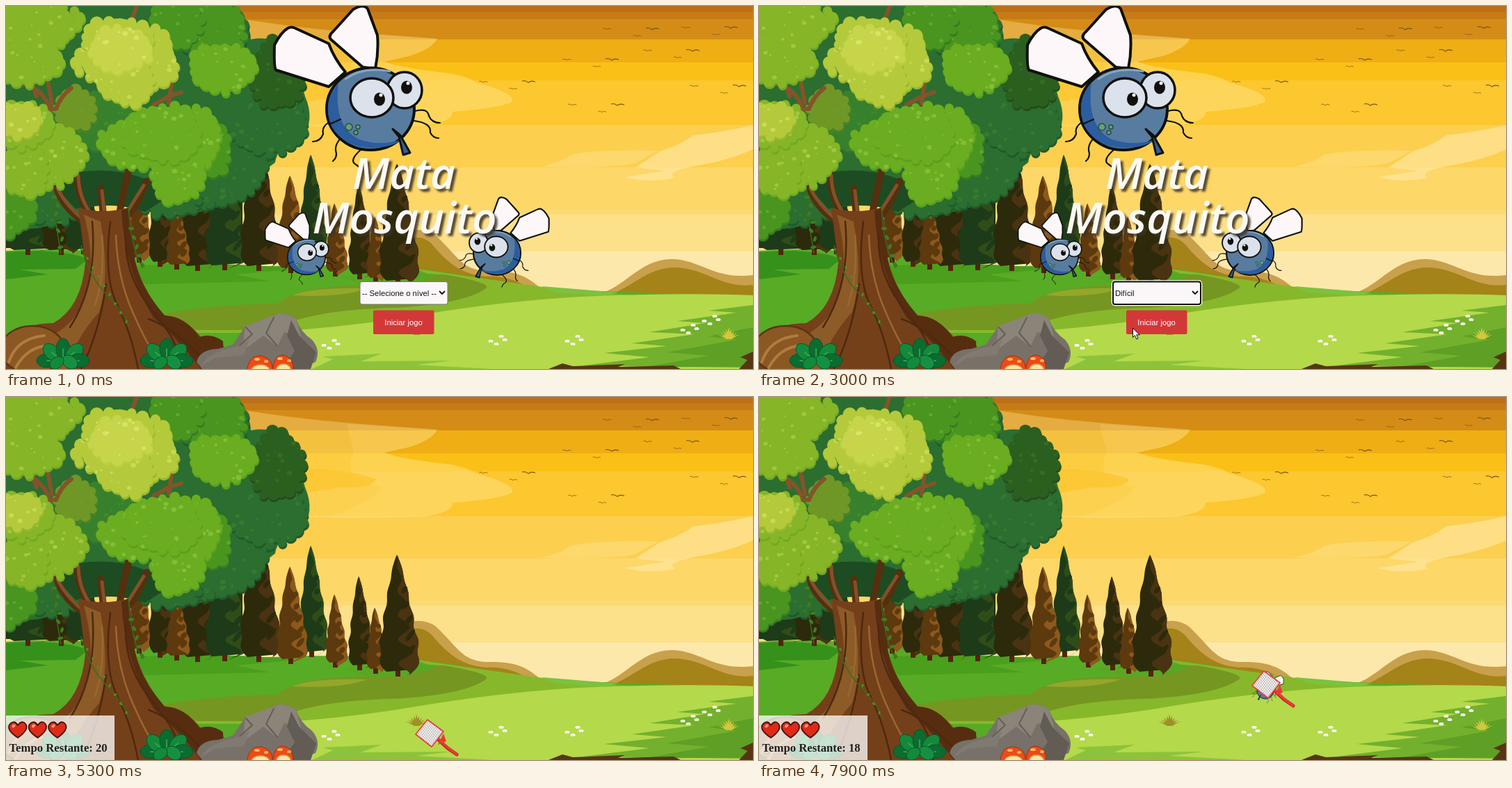
An HTML page with a canvas that plays this animation: 1074x522 px, repeating every 8 s.

```html
<!DOCTYPE html>
<html lang="pt">
<head>
<meta charset="utf-8">
<title>Mata Mosquito</title>
<style>
html, body { margin: 0; width: 100%; height: 100%; overflow: hidden; }
canvas { display: block; }
</style>
</head>
<body>
<canvas id="stage" width="1074" height="522"></canvas>
<script>
const W = 1074, H = 522, LOOP = 8000;
const stage = document.getElementById('stage').getContext('2d');
const backdrop = document.createElement('canvas');
backdrop.width = W; backdrop.height = H;
let g = backdrop.getContext('2d');

let seed = 7;
const rnd = () => (seed = (seed * 16807) % 2147483647) / 2147483647;

function shape(d, fill, stroke, width = 1) {
  const path = new Path2D(d);
  g.lineJoin = g.lineCap = 'round';
  if (fill) { g.fillStyle = fill; g.fill(path); }
  if (stroke) { g.strokeStyle = stroke; g.lineWidth = width; g.stroke(path); }
}
function oval(x, y, rx, ry, fill, stroke, width = 1, turn = 0) {
  g.beginPath();
  g.ellipse(x, y, rx, ry, turn, 0, 7);
  if (fill) { g.fillStyle = fill; g.fill(); }
  if (stroke) { g.strokeStyle = stroke; g.lineWidth = width; g.stroke(); }
}
function box(x, y, w, h, r, fill, stroke, width = 1) {
  g.beginPath();
  g.roundRect(x, y, w, h, r);
  if (fill) { g.fillStyle = fill; g.fill(); }
  if (stroke) { g.strokeStyle = stroke; g.lineWidth = width; g.stroke(); }
}
function label(text, x, y, font, fill, align = 'left') {
  g.font = font; g.fillStyle = fill; g.textAlign = align;
  g.fillText(text, x, y);
}

// ---------- landscape ----------
function sky() {
  [[0, '#bc7017'], [9, '#c77b16'], [19, '#d48c17'], [48, '#eeae14'], [81, '#fbc017'],
   [107, '#fcc72f'], [171, '#fccf4e'], [232, '#fdd768'], [293, '#fcda73'],
   [300, '#fce08a'], [353, '#fde8ab']].forEach(([y, color]) => {
    g.fillStyle = color; g.fillRect(0, y, W, H);
  });
  shape('M300 12Q400 30 500 38L620 47Q612 62 580 72L544 80Q570 90 640 97Q670 104 676 110Q735 126 727 138Q710 147 642 152Q644 166 600 172Q520 176 420 172L340 100Z', 'rgba(255,226,140,.36)');
  shape('M490 39L620 47Q612 62 580 72L544 80Q570 90 640 97Q670 104 676 110Q735 126 727 138Q710 147 642 152Q644 166 600 172L460 173Q530 150 540 130Q480 118 500 80Z', 'rgba(255,235,160,.13)');
  shape('M400 104Q480 100 532 118Q528 132 480 130L420 140Z', 'rgba(252,196,40,.65)');
  shape('M1074 171Q1040 180 988 186Q970 200 940 209L905 232 948 237 890 246Q920 255 962 247Q946 239 990 230Q1040 222 1074 206Z', 'rgba(255,233,165,.65)');
  shape('M770 231Q800 224 812 214Q850 206 938 208L905 226Q870 234 770 231Z', 'rgba(255,233,165,.35)');
  const bird = (x, y, s) =>
    shape(`M${x - 7 * s} ${y - s}q${4 * s} ${-s} ${7 * s} ${2 * s}q${3 * s} ${-3 * s} ${8 * s} ${-s}`, null, '#775616', s);
  [[864, 33], [977, 31], [922, 64], [806, 77], [686, 109], [989, 115], [814, 142]].forEach(([x, y]) => {
    bird(x, y, .75); bird(x + 65, y, 1.2); bird(x + 43, y + 10, .7);
  });
}

function land() {
  shape('M550 340Q590 310 618 330C650 360 655 379 690 381C740 380 750 390 780 415H560Z', '#c9a04c');
  shape('M550 350Q590 320 612 342C640 376 660 386 690 389Q730 386 765 415H550Z', '#a48318');
  shape('M845 416C890 408 910 362 960 364C1000 366 1020 394 1074 387V425H845Z', '#c9a04c');
  shape('M858 418C900 408 920 374 966 376C1010 380 1030 406 1074 401V425H850Z', '#a48318');
  shape('M0 352Q100 345 220 362T420 372Q560 372 640 384Q720 400 800 408L1074 418V522H0Z', '#58ab25');
  shape('M0 354Q80 348 118 364L100 378 20 379 60 386 0 393Z', '#35911a');
  shape('M180 374Q300 366 420 378L330 386 380 396 200 400Z', '#4a9f1c');
  shape('M590 378Q700 394 800 408L900 416 760 440 500 470 200 470 240 450 420 440Q610 430 640 400Z', '#87b82c');
  shape('M180 456Q250 430 390 428Q420 402 520 402Q560 384 630 386Q700 398 690 406Q660 428 560 434Q440 436 380 466H190Z', '#769622');
  shape('M412 416Q440 404 520 406Q480 420 412 416Z', '#93a72b');
  shape('M520 402Q600 404 620 386L560 380 480 390Z', '#58a723');
  shape('M770 403L880 412 860 417 790 412Z', '#7bc23f');
  shape('M390 468Q480 462 560 450Q720 422 850 417T1074 416V522H380Z', '#b4d94b');
  shape('M440 522L470 508 455 504 540 500 510 511 640 510 590 516 700 522Z', '#8dc33b');
  shape('M1074 430L1010 438 1050 441 965 453 1005 456 925 469 990 472 900 485 950 489 860 499 925 505 830 517 1074 520Z', '#73b02d');
  shape('M1074 462L1010 475 1050 480 950 498 1010 503 920 519H1074Z', '#5e9f25');
  shape('M1074 497L1056 505 1066 509 1054 522H1074ZM780 522L800 514 815 518 890 515 880 519 960 517 970 522Z', '#573512');
  [[466, 487], [706, 481], [816, 481], [982, 465], [1013, 452]].forEach(([x, y]) => {
    [[-9, 1], [6, -6], [11, -1], [-1, 5]].forEach(([dx, dy]) => {
      oval(x + dx, y + dy, 3.5, 2, '#fff');
      oval(x + dx, y + dy + 1, 1, .8, '#e7d66a');
    });
  });
  const tuft = (x, y, color) => {
    for (let i = -4; i <= 4; i++)
      shape(`M${x - 3} ${y + 8}L${x + i * 4} ${y - 9 + Math.abs(i) * 2.5}L${x + 4} ${y + 8}Z`, color);
  };
  tuft(590, 465, '#a08f2a');
  tuft(1039, 471, '#d1c83c');
}

function pine(x, top, base, w, dark, lit) {
  const half = t => w * 1.12 * Math.min(1, 1.1 * t ** .75) * (1 - .07 * Math.cos(t * 30)) * Math.sqrt(1 - .6 * t ** 12);
  const inner = t => half(t) * (.35 + .4 * Math.sin(t * 30 + x));
  const at = t => top + (base - top) * t;
  const fill = (left, color) => {
    g.beginPath();
    g.moveTo(x, top);
    for (let t = 0; t <= 1; t += .02) g.lineTo(x + half(t) + 4 * t, at(t));
    for (let t = 1; t >= 0; t -= .02) g.lineTo(x + left(t) + 4 * t, at(t) + (left === inner ? 5 : 0));
    g.fillStyle = color;
    g.fill();
  };
  g.fillStyle = '#54220d';
  g.fillRect(x - 2, base - 4, 7, 11);
  fill(t => -half(t), dark);
  fill(inner, lit);
  for (let t = .3; t < .95; t += .13)
    oval(x + half(t) * .75, at(t), half(t) * .4, 3.5, dark, null, 1, -.9);
}

function forest() {
  const brown = ['#5d390e', '#8d591c'], umber = ['#2c2a0b', '#4a3312'], green = ['#1d3b18', '#304c18'];
  shape('M0 270H108V348H0ZM225 270H340V368L225 366Z', '#25310f');
  [[30, 240, 351, 32, green], [78, 240, 351, 28, umber], [110, 250, 350, 26, green],
   [190, 240, 362, 15, brown], [220, 220, 368, 17, umber], [274, 210, 374, 25, umber],
   [244, 280, 372, 16, brown], [313, 210, 373, 28, green], [362, 190, 374, 27, umber],
   [438, 214, 367, 20, green], [408, 244, 377, 21, brown], [472, 284, 382, 15, brown],
   [507, 258, 386, 17, umber], [530, 303, 391, 14, brown], [562, 227, 395, 27, umber]]
    .forEach(([x, top, base, w, tone]) => pine(x, top, base, w, ...tone));
}

// Irregular scalloped leaf mass with a shaded lower rim and light spots.
function leaves(x, y, rx, ry, color, rim, spot) {
  const bumps = Math.round((rx + ry) / 5.5);
  const reach = a => .9 + .06 * Math.sin(3 * a + x) + .05 * Math.sin(5 * a + y);
  const mass = (dx, dy, fill) => {
    oval(x + dx, y + dy, rx * .84, ry * .84, fill);
    for (let i = 0; i < bumps; i++) {
      const a = i / bumps * Math.PI * 2, r = 8 + 2 * Math.sin(i * 5 + x);
      oval(x + dx + Math.cos(a) * (rx * reach(a) - r * .6), y + dy + Math.sin(a) * (ry * reach(a) - r * .6), r, r, fill);
    }
  };
  mass(1, 3, rim);
  mass(0, 0, color);
  for (let i = 0; i < rx * ry / 170; i++) {
    const a = rnd() * 6.28, d = Math.sqrt(rnd()) * .85, s = 1 + rnd() * 3;
    oval(x + Math.cos(a) * rx * d, y + Math.sin(a) * ry * d, s, s * .85, spot);
  }
}

function tree() {
  const deep = ['#2b6e30', '#20592a', 'rgba(75,145,45,.35)'];
  const mid = ['#4a951f', '#357c22', 'rgba(120,185,55,.5)'];
  const fresh = ['#6bad20', '#5c9f1e', 'rgba(150,205,75,.55)'];
  const light = ['#86b527', '#72a823', 'rgba(180,215,85,.55)'];
  const sunny = ['#b4ca3b', '#9bb730', 'rgba(215,228,105,.6)'];
  shape('M0 0H302L322 15Q352 20 352 48Q395 40 415 75L430 130Q445 165 425 190Q390 200 387 225Q360 245 350 260Q340 285 290 292Q240 312 205 294Q170 282 110 290Q60 330 0 318Z', '#2b6e30');
  [[300, 40, 54, 50], [60, 272, 72, 44], [240, 268, 66, 38], [310, 230, 70, 62], [375, 170, 66, 48]]
    .forEach(a => leaves(...a, ...deep));
  shape('M62 250Q160 215 240 270L200 296Q150 280 100 292Z', '#1d4c22');
  leaves(150, 165, 60, 55, '#38812c', '#2f7430', 'rgba(90,155,45,.35)');
  leaves(390, 98, 45, 55, '#2b5f20', '#244d1a', 'rgba(70,125,35,.45)');
  leaves(100, 148, 34, 33, '#6f9726', '#4b8126', 'rgba(120,160,50,.4)');
  [[295, 30, 56, 45], [245, 20, 42, 45]].forEach(a => leaves(...a, ...mid));
  shape('M25 112Q55 120 62 148H72Q78 130 94 118M44 130L38 112M66 140L60 108M212 142L234 130 252 124M234 140L238 110M180 22L188 0', null, '#85532a', 6);

  shape('M72 258Q80 292 124 318M102 240Q102 280 130 312M136 262L142 320M180 222Q164 285 160 320M202 252Q186 296 164 312', null, '#54300f', 10);
  shape('M74 262Q88 292 128 320M104 244Q104 280 132 312M138 266L144 320M198 258Q178 290 160 318', null, '#82502a', 5);
  shape('M104 290Q138 300 176 290Q184 320 182 350Q192 405 228 445Q262 452 280 476Q305 470 314 492L306 522H0V480Q24 456 68 456Q108 434 114 370Z', '#74401a');
  shape('M166 294Q170 380 212 448Q258 490 280 522H314L312 482Q296 470 278 476Q258 446 228 445Q180 390 184 340L176 290Z', '#572d10');
  shape('M112 300Q128 360 118 400Q110 452 64 475L50 522H88Q98 480 134 440Q150 390 136 310Z', '#8d5b27');
  shape('M150 310Q140 390 160 430T190 522M124 310Q132 400 92 462M172 330Q170 390 212 440T250 522M144 400Q134 470 108 522M205 450Q240 462 285 510', null, '#4d290f', 2.5);
  shape('M138 330Q142 390 128 430M158 330Q160 390 182 440T220 510', null, '#9a6831', 2.5);
  oval(38, 494, 46, 34, '#8b5723', '#5a3313', 2.5);
  shape('M4 512Q15 478 55 474M14 520Q30 490 62 488', null, '#b07c3e', 4);
  shape('M108 345Q120 390 144 414T176 460M68 262Q70 310 79 355M176 290Q180 350 196 376', null, '#376c1d', 1.5);
  for (let i = 0; i < 9; i++) {
    oval(109 + i * 8, 350 + i * 13, 2.5, 1.6, '#508c27', null, 1, i);
    if (i < 7) oval(69 + i * 1.5 + i % 2 * 4, 275 + i * 12, 4, 2.2, '#427a22', null, 1, i);
    if (i < 5) oval(180 + i * 4, 320 + i * 13, 4, 2.4, '#427a22', null, 1, i);
  }

  leaves(8, 288, 37, 46, ...mid);
  [[22, 28, 92, 50], [28, 82, 58, 34]].forEach(a => leaves(...a, ...light));
  leaves(311, 89, 52, 39, ...fresh);
  leaves(288, 205, 40, 45, ...mid);
  [[180, 198, 50, 40], [262, 190, 52, 50], [246, 243, 42, 44], [225, 183, 62, 46]]
    .forEach(a => leaves(...a, ...fresh));
  [[60, 215, 61, 48], [24, 235, 42, 42], [22, 170, 50, 38]].forEach(a => leaves(...a, ...light));
  [[16, 164, 38, 28], [175, 75, 80, 56], [174, 108, 44, 38], [160, 50, 56, 38]].forEach(a => leaves(...a, ...sunny));
  leaves(164, 62, 48, 36, '#c6d54a', '#bccf40', 'rgba(228,236,120,.6)');
}

function foreground() {
  const plant = (x, y) => {
    for (let i = 0; i < 5; i++) {
      const a = Math.PI * (1 + i / 4);
      const px = x + Math.cos(a) * 23, py = y + 10 + Math.sin(a) * 17;
      oval(px, py, 15, 10, i % 2 ? '#14893c' : '#0b6c30', '#08552a', 1, a);
      shape(`M${x} ${y + 12}L${px} ${py}`, null, '#43ad47', 1.5);
    }
    oval(x + 10, y + 12, 12, 9, '#159042', '#08552a', 1, .6);
    oval(x - 9, y + 13, 11, 8, '#128a3c', '#08552a', 1, -.6);
  };
  shape('M274 512Q278 494 305 493L326 487Q338 470 344 460Q366 454 385 444Q403 438 417 450Q423 468 440 480Q453 495 445 512L420 522H282Z', '#77716a');
  shape('M344 460Q372 450 392 442Q406 441 417 450L424 475 400 469 390 490 370 474 340 496Z', '#8b8479');
  shape('M410 452L422 475 446 498 438 522H398L415 496 404 474Z', '#625c55');
  shape('M280 518Q290 498 330 490L350 480 342 502 300 506Z', '#817a71');
  shape('M345 462L354 472 336 488M385 448L374 470 390 489', null, '#655f58', 2);
  plant(82, 500); plant(231, 500);
  const mushroom = (x, y, s) => {
    shape(`M${x - 20 * s} ${y + 14}Q${x - 18 * s} ${y - 12} ${x} ${y - 11}Q${x + 20 * s} ${y - 8} ${x + 17 * s} ${y + 14}Z`, '#eb4b17', '#a92b0c');
    oval(x, y + 10, 13 * s, 8, '#fbe3a2', '#d5a65a', 1.5);
    oval(x - 5, y - 6, 4, 2, '#ffb65a'); oval(x + 8, y - 3, 3, 2, '#ffb65a');
  };
  mushroom(366, 514, 1); mushroom(399, 513, .8);
}

// ---------- actors ----------
function mosquito(x, y, scale, flip = false) {
  g.save();
  g.translate(x, y);
  g.scale(flip ? -scale : scale, scale);
  g.translate(-524, -148);
  const ink = '#10110e', wing = '#fdf7f9';
  shape('M482 160Q452 168 456 184Q452 195 441 195M488 184Q470 198 475 212Q475 219 470 223M512 205Q492 222 503 228Q510 232 511 239M588 151Q606 146 608 158Q612 168 624 168M586 165Q612 168 610 182Q614 190 622 190', null, ink, 2.2);
  shape('M513 88L467 48Q463 43 470 37L499 5Q514 -4 520 4L534 42Q536 66 531 90Z', wing, ink, 4);
  shape('M388 92Q385 88 386 56Q395 38 405 32Q410 29 416 32L464 54Q472 76 488 95L464 116Z', wing, ink, 4);
  oval(524, 148, 63, 59, '#587ca0', ink, 4);
  shape('M478 110Q454 138 468 173Q485 203 525 204Q555 204 570 192Q538 202 508 192Q470 174 478 110Z', '#2b5d9f');
  shape('M488 105Q515 86 552 94', null, '#87a6c2', 3);
  oval(573, 121, 25, 26, '#dce2ec', ink, 3.5);
  oval(526, 132, 31, 28, '#dce2ec', ink, 3.5);
  [[537, 134], [576, 117]].forEach(([px, py]) => {
    oval(px, py, 8, 9.5, ink);
    oval(px + 2, py - 6, 2.5, 2.5, '#fff');
  });
  shape('M556 177L565 188 571 214 581 211 567 186Z', '#345f91', ink, 3);
  [[493, 174, 5], [503, 182, 3], [506, 174, 3]].forEach(([px, py, r]) => oval(px, py, r, r, '#62a273', '#244d41', 1.5));
  shape('M465 170L481 163', null, ink, 2.2);
  g.restore();
}

function swatter(x, y) {
  g.save();
  g.translate(x, y);
  shape('M34 30L47 42 60 51', null, '#b51d20', 5);
  shape('M35 30L47 41 60 51', null, '#e93a36', 3.5);
  shape('M33 37L41 21 45 32Z', '#e93a36');
  const net = 'M18 1L41 18L24 40L1 22Z';
  shape(net, '#fbf8f6');
  g.save();
  g.clip(new Path2D(net));
  for (let i = -40; i < 80; i += 3.5)
    shape(`M${i} 0L${i + 34} 42M${i} 42L${i + 34} 0`, null, 'rgba(95,90,95,.5)', .7);
  g.restore();
  shape(net, null, '#e2413b', 1.8);
  g.restore();
}

function arrow(x, y) {
  g.save();
  g.translate(x, y);
  shape('M.5 .5V13.5L3.5 10.7L5.8 16L8 15L5.8 9.8H10Z', '#fff', '#111', 1);
  g.restore();
}

function heart(x) {
  shape(`M${x + 13} 490Q${x - 5} 478 ${x + 2} 470Q${x + 8} 464 ${x + 13} 472Q${x + 19} 464 ${x + 24} 470Q${x + 30} 478 ${x + 13} 490Z`, '#df2a17', '#43130c', 1.8);
  oval(x + 7, 473, 3, 2, '#f79a82', null, 1, -.6);
}

// ---------- screens ----------
const UI = '11.25px "Liberation Sans", Arial, sans-serif';
const LEVELS = ['-- Selecione o nível --', 'Normal', 'Difícil', 'Dirk Valmont'];

function focusRing(x, y, w, h) {
  box(x - 1.5, y - 1.5, w + 3, h + 3, 4, null, '#fff', 1.5);
  box(x, y, w, h, 3, null, '#101010', 2);
}

function menu(t) {
  mosquito(524, 148, 1);
  mosquito(432, 361, .43);
  mosquito(706, 355, .54, true);

  g.save();
  g.shadowColor = 'rgba(60,50,35,.85)';
  g.shadowOffsetX = g.shadowOffsetY = 4;
  g.shadowBlur = 3;
  const titleFont = 'italic 600 62px "Open Sans", sans-serif';
  label('Mata', 572, 263, titleFont, '#faf9f5', 'center');
  label('Mosquito', 573, 327, titleFont, '#faf9f5', 'center');
  g.restore();

  const open = t >= 1600 && t < 3000;
  const chosen = t >= 3000;
  box(509, 396.5, 126, 32.5, 3, '#fbf7f9', '#767676');
  if (chosen && t < 5000) focusRing(509, 396.5, 126, 32.5);
  label(LEVELS[chosen ? 2 : 0], 512, 417, UI, '#111');
  shape('M623.5 410.5L627 414L630.5 410.5', null, '#111', 1.8);

  box(528, 437.5, 87.5, 34.5, 2, '#d33839');
  if (t >= 5000) focusRing(528, 437.5, 87.5, 34.5);
  label('Iniciar jogo', 571.5, 459, UI, '#fff', 'center');

  if (open) {
    g.save();
    g.shadowColor = 'rgba(0,0,0,.45)'; g.shadowBlur = 4; g.shadowOffsetY = 2;
    box(509, 429.5, 126, 57.5, 0, '#fbf7f9');
    g.restore();
    const active = t < 2200 ? 0 : t < 2400 ? 1 : 2;
    g.fillStyle = '#1e90ff';
    g.fillRect(509, 430 + active * 14, 126, 14);
    LEVELS.forEach((name, i) => label(name, 512, 440.5 + i * 14, UI, i === active ? '#fff' : '#111'));
    box(509, 429.5, 126, 57.5, 0, null, '#6b6b6b');
  }
}

function game(t) {
  if (t >= 5700 && t < 6400) mosquito(390, 225, .21);
  if (t >= 6600) mosquito(728, 423, .19, true);
  g.fillStyle = 'rgba(255,255,255,.76)';
  g.fillRect(0, 458, 156, 64);
  [4, 32.5, 61].forEach(heart);
  const left = t < 6200 ? 20 : t < 7100 ? 19 : 18;
  label('Tempo Restante: ' + left, 4.5, 510, 'bold 16.7px "Liberation Serif", serif', '#211f1d');
}

// Pointer path: time, x, y, and how it looks from then on.
const POINTER = [
  [500, 480, 22, swatter], [600, 290, 250, swatter], [700, 66, 465, swatter],
  [800, 66, 465, swatter], [900, 150, 430, swatter], [1200, 530, 440, swatter],
  [1300, 573, 413, arrow], [1900, 573, 413, arrow], [2500, 537, 463, arrow],
  [3300, 537, 463, arrow], [3500, 593, 449, arrow], [3600, 593, 449, arrow],
  [3700, 588, 451, arrow], [3800, 588, 451, arrow], [3900, 626, 400, swatter],
  [4100, 697, 329, swatter], [4200, 690, 345, swatter], [4500, 618, 445, swatter],
  [4600, 598, 463, arrow], [4700, 598, 463, arrow], [4800, 588, 463, arrow],
  [5300, 588, 463, swatter], [5600, 588, 463, swatter], [5800, 199, 290, swatter],
  [6300, 199, 290, swatter], [6400, 367, 195, swatter], [6600, 505, 119, swatter],
  [7600, 505, 119, swatter], [7800, 680, 360, swatter], [7900, 708, 393, swatter]
];
function pointer(t) {
  const i = POINTER.findLastIndex(key => key[0] <= t);
  if (i < 0) return;
  const [t0, x0, y0, draw] = POINTER[i];
  const [t1, x1, y1] = POINTER[i + 1] || [LOOP, x0, y0];
  const k = (t - t0) / (t1 - t0);
  draw(Math.round(x0 + (x1 - x0) * k), Math.round(y0 + (y1 - y0) * k));
}

sky(); land(); forest(); tree(); foreground();
g = stage;

function frame() {
  const t = Math.floor(performance.now() % LOOP / 100) * 100;
  g.drawImage(backdrop, 0, 0);
  (t < 5300 ? menu : game)(t);
  pointer(t);
  requestAnimationFrame(frame);
}
frame();
</script>
</body>
</html>
```
